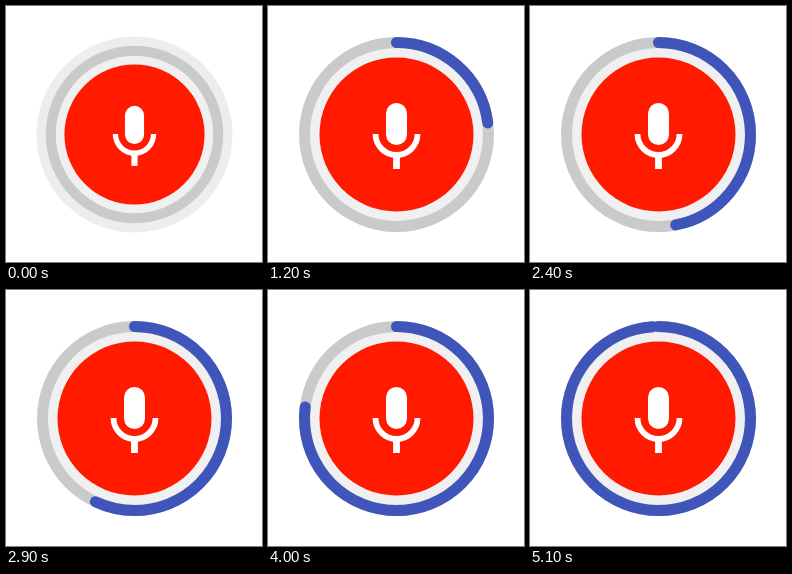
Animation, 256 px wide and 256 px high, one loop 5.2 s. Source, as an HTML page with a canvas:

```html
<!DOCTYPE html>
<html lang="en">
<head>
<meta charset="utf-8">
<title>Recording progress</title>
<style>
  html, body { margin: 0; width: 100%; height: 100%; overflow: hidden; background: #fff; }
  canvas { display: block; width: 256px; height: 256px; }
</style>
</head>
<body>
<canvas id="stage" width="256" height="256"></canvas>
<script>
const ctx = document.getElementById('stage').getContext('2d');
const LOOP = 5200, STEP = 100, HOLD_STEP = 39;
const CENTER = 128.5, RING = 92, RING_WIDTH = 11;
const RED = '#ff1a00', BLUE = '#3f55b9', GRAY = '#cacacb', LIGHT = '#f0f0f1';
const TOP = -Math.PI / 2;

function disc(radius, color) {
  ctx.fillStyle = color;
  ctx.beginPath();
  ctx.arc(0, 0, radius, 0, Math.PI * 2);
  ctx.fill();
}

function arc(y, radius, from, to, width, color, cap) {
  ctx.strokeStyle = color;
  ctx.lineWidth = width;
  ctx.lineCap = cap;
  ctx.beginPath();
  ctx.arc(0, y, radius, from, to);
  ctx.stroke();
}

function microphone() {
  ctx.fillStyle = '#fff';
  ctx.beginPath();
  ctx.roundRect(-10.5, -31.5, 21, 42, 10.5);
  ctx.fill();
  arc(-0.5, 21, 0, Math.PI, 5.8, '#fff', 'butt');
  ctx.fillRect(-3.4, 20, 6.8, 14.5);
}

function draw(time) {
  const step = Math.floor((time % LOOP) / STEP);
  const pressed = step === 0;
  ctx.setTransform(1, 0, 0, 1, 0, 0);
  ctx.fillStyle = '#fff';
  ctx.fillRect(0, 0, 256, 256);
  ctx.translate(CENTER, CENTER);
  if (pressed) {
    disc(98, '#ededee');
    ctx.scale(0.91, 0.91);
  }
  disc(RING + RING_WIDTH / 2, GRAY);
  disc(RING - RING_WIDTH / 2, LIGHT);
  disc(77, RED);
  microphone();
  if (!pressed) {
    // Fifty steps make a full turn; one step repeats the previous pose.
    const turn = (step - 0.5 - (step >= HOLD_STEP ? 1 : 0)) / 50;
    arc(0, RING, TOP, TOP + turn * Math.PI * 2, RING_WIDTH, BLUE, 'round');
  }
}

const start = performance.now();
function tick() {
  draw(performance.now() - start);
  requestAnimationFrame(tick);
}
tick();
</script>
</body>
</html>
```
